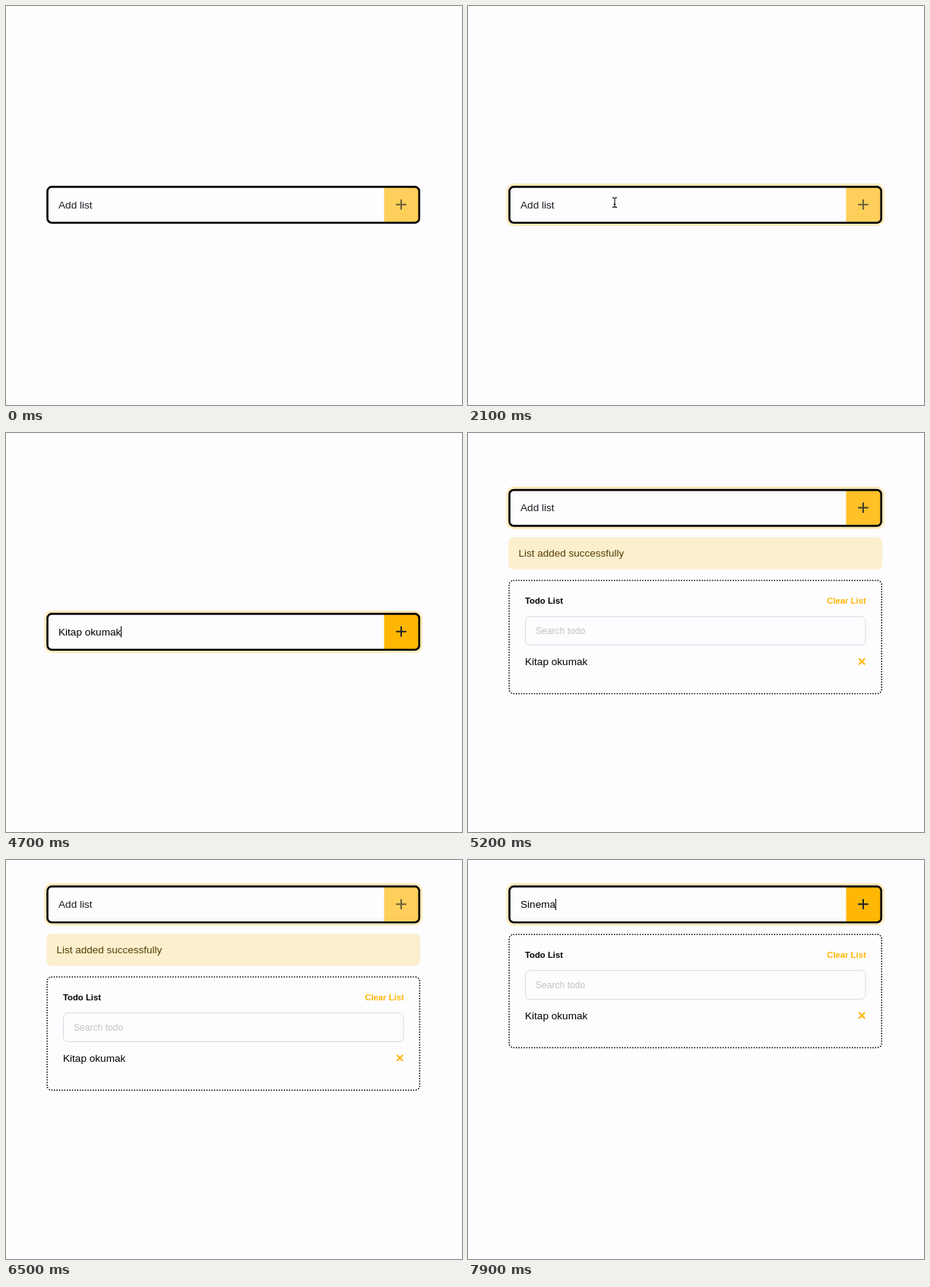
An HTML page with a canvas that plays this animation: 600x526 px, repeating every 8 s.

```html
<!DOCTYPE html>
<html lang="en">
<head>
<meta charset="utf-8">
<title>Todo list</title>
<style>
  html, body { margin: 0; width: 100%; height: 100%; overflow: hidden; background: #fdfcff; }
  canvas { display: block; width: 600px; height: 526px; }
</style>
</head>
<body>
<canvas id="stage"></canvas>
<script>
const W = 600, H = 526, LOOP = 8000, STEP = 100;
const BG = '#fdfcff', AMBER = '#ffb703', INK = '#000';
const FONT = '"Liberation Sans", Arial, Helvetica, sans-serif';
const SUBMIT = 5000, TOAST_END = 7500, START_SHIFT = 203.5, TOAST_H = 56;

const entries = [
  { text: 'Kitap okumak', from: 0,
    keys: [2600, 2700, 2900, 3100, 3300, 3500, 3700, 3900, 4100, 4400, 4500, 4700] },
  { text: 'Sinema', from: SUBMIT + STEP, keys: [6700, 6900, 7100, 7300, 7600, 7800] }
];

const canvas = document.getElementById('stage');
const ctx = canvas.getContext('2d');
const dpr = window.devicePixelRatio || 1;
canvas.width = W * dpr;
canvas.height = H * dpr;

const clamp = v => Math.min(1, Math.max(0, v));
const mix = (a, b, k) => a + (b - a) * k;
const progress = (t, start, length) => clamp((t - start) / length);

// The CSS "ease" curve, cubic-bezier(.25, .1, .25, 1)
function ease(x) {
  if (x <= 0 || x >= 1) return clamp(x);
  const curve = (a, b, s) => 3 * a * s * (1 - s) ** 2 + 3 * b * s * s * (1 - s) + s ** 3;
  let lo = 0, hi = 1;
  for (let i = 0; i < 24; i++) {
    const mid = (lo + hi) / 2;
    if (curve(0.25, 0.25, mid) < x) lo = mid; else hi = mid;
  }
  return curve(0.1, 1, lo);
}

function box(x, y, w, h, r) {
  ctx.beginPath();
  ctx.roundRect(x, y, w, h, r);
}

function label(text, x, y, size, color, weight = 400, align = 'left') {
  ctx.font = `${weight} ${size}px ${FONT}`;
  ctx.fillStyle = color;
  ctx.textAlign = align;
  ctx.fillText(text, x, y);
}

function strokeLines(lines, color, width) {
  ctx.strokeStyle = color;
  ctx.lineWidth = width;
  ctx.beginPath();
  for (const [x1, y1, x2, y2] of lines) {
    ctx.moveTo(x1, y1);
    ctx.lineTo(x2, y2);
  }
  ctx.stroke();
}

function typing(t) {
  const entry = t < entries[1].from ? entries[0] : entries[1];
  const count = entry.keys.filter(k => k <= t).length;
  return { value: entry.text.slice(0, count) };
}

function caretOn(t) {
  if (t < 1200) return false;
  const keys = [1300, ...entries[0].keys, ...entries[1].keys].filter(k => k <= t);
  const last = keys.length ? keys[keys.length - 1] : 1200;
  return (t - last) % 1000 < 500;
}

function buttonAlpha(t) {
  const dim = 0.65;
  if (t < SUBMIT) return mix(dim, 1, ease(progress(t, 2570, 300)));
  if (t < 6600) return mix(1, dim, ease(progress(t, 5130, 270)));
  return mix(dim, 1, ease(progress(t, 6670, 300)));
}

function drawInput(t) {
  const ring = ease(progress(t, 1150, 300));
  if (ring > 0) {
    ctx.strokeStyle = `rgba(255, 183, 3, ${0.27 * ring})`;
    ctx.lineWidth = 3;
    box(51.7, 32.1, 494.8, 52.9, 8.5);
    ctx.stroke();
  }

  ctx.save();
  box(53.2, 33.6, 491.8, 49.9, 7);
  ctx.fillStyle = BG;
  ctx.fill();
  ctx.clip();
  ctx.globalAlpha = buttonAlpha(t);
  ctx.fillStyle = AMBER;
  ctx.fillRect(497.5, 34, 47, 49);
  ctx.lineCap = 'round';
  strokeLines([[514, 58.2, 526, 58.2], [520, 52.2, 520, 64.2]], '#212529', 2);
  ctx.restore();

  ctx.strokeStyle = INK;
  ctx.lineWidth = 2.6;
  box(54.5, 34.9, 489.2, 47.3, 5.7);
  ctx.stroke();

  const { value } = typing(t);
  label(value || 'Add list', 69, 63, 13.6, value ? INK : '#1d1e22');
  if (caretOn(t)) {
    const end = value ? 69 + ctx.measureText(value).width : 68.6;
    ctx.fillStyle = INK;
    ctx.fillRect(Math.round(end - 0.5), 51, 1, 15);
  }
}

function drawToast() {
  box(53.2, 97.2, 491.8, 42.3, 6.8);
  ctx.fillStyle = '#fcefce';
  ctx.fill();
  label('List added successfully', 66.5, 123.2, 13.5, '#553e04');
}

function drawList() {
  ctx.save();
  ctx.strokeStyle = INK;
  ctx.lineWidth = 1.75;
  ctx.lineCap = 'round';
  ctx.setLineDash([0, 3.4]);
  box(54.1, 154.1, 490.2, 149.3, 6);
  ctx.stroke();
  ctx.restore();

  label('Todo List', 75, 185.2, 11.3, INK, 700);
  label('Clear List', 523.7, 185.2, 11.3, AMBER, 700, 'right');

  ctx.strokeStyle = '#dad9dd';
  ctx.lineWidth = 1;
  box(75.5, 201.7, 447.6, 37.8, 6);
  ctx.stroke();
  label('Search todo', 89, 224.7, 12.1, '#c3c2c6');

  label('Kitap okumak', 75, 265.8, 13.6, INK);
  strokeLines([[514.3, 257, 522.3, 265], [522.3, 257, 514.3, 265]], AMBER, 2);
}

function drawArrow(x, y) {
  ctx.save();
  ctx.translate(x, y);
  ctx.beginPath();
  [[0, 0], [0, 13.5], [3.1, 10.6], [5.2, 15.4], [7.3, 14.5], [5.3, 9.8], [9.5, 9.6]]
    .forEach(p => ctx.lineTo(...p));
  ctx.closePath();
  ctx.fillStyle = INK;
  ctx.fill();
  ctx.strokeStyle = '#fff';
  ctx.lineWidth = 1;
  ctx.stroke();
  ctx.restore();
}

function drawBeam(x, y) {
  ctx.save();
  ctx.translate(x, y);
  ctx.strokeStyle = '#111';
  ctx.lineWidth = 1.1;
  ctx.beginPath();
  for (const s of [-1, 1]) {
    ctx.moveTo(-3, 6.4 * s);
    ctx.quadraticCurveTo(0, 6.4 * s, 0, 4.4 * s);
    ctx.quadraticCurveTo(0, 6.4 * s, 3, 6.4 * s);
  }
  ctx.moveTo(0, -5);
  ctx.lineTo(0, 5);
  ctx.moveTo(-1.6, 2.2);
  ctx.lineTo(1.6, 2.2);
  ctx.stroke();
  ctx.restore();
}

function drawPointer(t) {
  if (t < 300 || t >= 2600) return;
  const k = 1 - (1 - progress(t, 300, 800)) ** 3;
  const drift = ease(progress(t, 1700, 400));
  const x = mix(226, 189, k) + 4 * drift;
  const y = mix(405, 261, k) - 2 * drift;
  if (y < 287) drawBeam(x, y); else drawArrow(x, y);
}

function draw(t) {
  ctx.setTransform(dpr, 0, 0, dpr, 0, 0);
  ctx.fillStyle = BG;
  ctx.fillRect(0, 0, W, H);

  ctx.save();
  ctx.translate(0, START_SHIFT * (1 - ease(progress(t, SUBMIT, 400))));
  drawInput(t);
  if (t > SUBMIT) {
    if (t < TOAST_END) drawToast();
    else ctx.translate(0, -TOAST_H);
    drawList();
  }
  ctx.restore();
  drawPointer(t);
}

const begin = performance.now();
function tick() {
  const t = (performance.now() - begin) % LOOP;
  draw(Math.floor(t / STEP) * STEP);
  requestAnimationFrame(tick);
}
tick();
</script>
</body>
</html>
```
